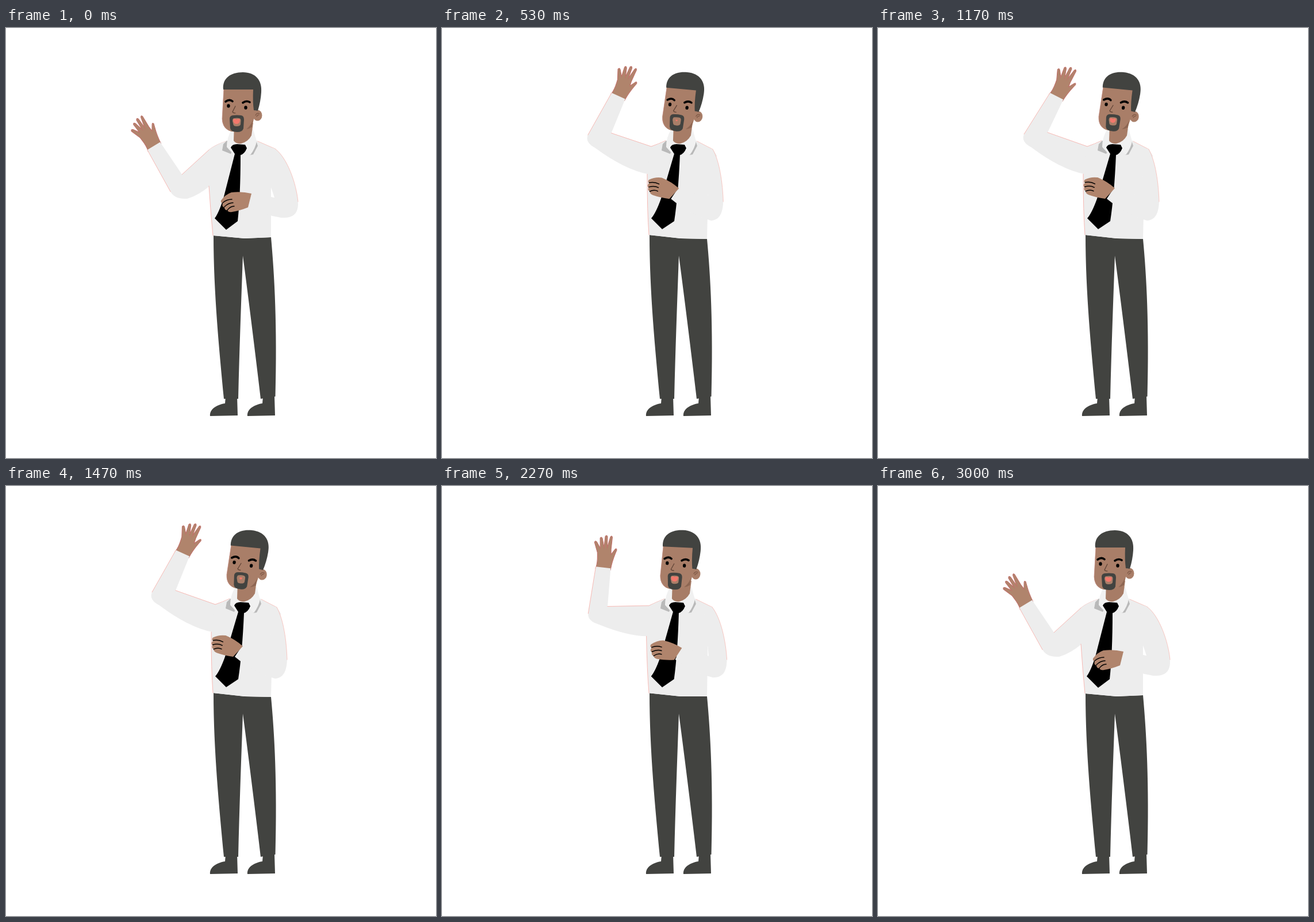
An HTML page with a canvas for the animation above (3030 ms loop, 748 by 748 pixels).

```html
<!DOCTYPE html>
<html>
<head>
<meta charset="utf-8">
<style>
html, body { margin: 0; width: 100%; height: 100%; overflow: hidden; background: #fff; }
canvas { display: block; width: 748px; height: 748px; }
</style>
</head>
<body>
<canvas id="stage" width="748" height="748"></canvas>
<script>
const ctx = document.getElementById('stage').getContext('2d');
const LOOP = 3030, RAD = Math.PI / 180;
const DARK = '#424340', SHIRT = '#ededed', SKIN = '#b0846c', FACE = '#a97e68', FRINGE = '#f6b3ad';

const clamp = x => Math.min(1, Math.max(0, x));
const lerp = (a, b, p) => a + (b - a) * p;
const smooth = x => (x = clamp(x), x * x * (3 - 2 * x));
const cubic = x => (x = clamp(x), x < .5 ? 4 * x ** 3 : 1 - 4 * (1 - x) ** 3);

// Blend two path strings of the same structure
function mix(a, b, p) {
  const to = b.match(/-?[\d.]+/g);
  let i = 0;
  return a.replace(/-?[\d.]+/g, n => lerp(+n, +to[i++], p));
}
function fill(color, d) {
  ctx.fillStyle = color;
  ctx.fill(new Path2D(d));
}
function line(color, width, d) {
  ctx.strokeStyle = color;
  ctx.lineWidth = width;
  ctx.stroke(new Path2D(d));
}
function dot(color, x, y, rx, ry = rx) {
  ctx.fillStyle = color;
  ctx.beginPath();
  ctx.ellipse(x, y, rx, ry, 0, 0, 7);
  ctx.fill();
}
function placed(x, y, angle, draw) {
  ctx.save();
  ctx.translate(x, y);
  ctx.rotate(angle);
  draw();
  ctx.restore();
}

// Time and opening of the mouth
const talk = [[0, 1], [180, .5], [340, 1], [530, .3], [720, .9], [870, .6], [1020, .35],
  [1230, 1], [1470, .4], [1660, .9], [1870, .55], [2040, .4], [2270, 1], [2480, .4], [2740, .8], [2900, .6], [3030, 1]];
function mouthAt(t) {
  const i = talk.findIndex(k => k[0] > t), [t0, a] = talk[i - 1], [t1, b] = talk[i];
  return lerp(a, b, smooth((t - t0) / (t1 - t0)));
}

function legs(p) {
  fill(DARK, mix(
    'M361,361 L415,366 L461,364 C467,430 472,520 468.5,641 L443,645 Q427,510 412,396 C409,480 406,560 404,645 L379,645 C371,560 361,460 361,361Z',
    'M361,360 L415,366 L461,367 C467,430 472,520 468.5,641 L443,645 Q427,510 412,396 C409,480 406,560 404,645 L379,645 C371,560 361,460 361,360Z', p));
  for (const x of [0, 65])
    placed(x, 0, 0, () => fill(DARK, 'M382,641 L402,640 L403,674 L355,675 C354,664 364,656 381,653Z'));
}

function waveHand() {
  const d = 'M-13,3 C-10,-8 -12,-16 -13,-25 L-20,-42 Q-19,-46 -16,-43 L-9,-33 L-11,-50 Q-9.5,-54 -7,-50 L-2.5,-35 ' +
    'L-2.5,-54 Q-.5,-58 1.5,-54 L3,-35 L6.5,-54 Q8.5,-58 10,-54 L10,-33 L11,-24 L16.5,-33 Q19,-37 20,-33 C17,-22 14,-14 13,3Z';
  fill(SKIN, d);
  line('#c0706a', 1.1, d);
}

function leftArm(p, t) {
  const up = lerp(132.6, 195.4, p) * RAD;
  const ex = 355 + 84 * Math.cos(up), ey = 212 + 84 * Math.sin(up);
  const wave = -2.5 * Math.cos((t - 1670) / 900 * 2 * Math.PI);
  const lean = (lerp(-31, 25, p) + wave * p) * RAD;
  const c = Math.cos(lean), s = Math.sin(lean);
  const wx = ex + 80 * s, wy = ey - 80 * c;
  const at = (x0, y0, x1, y1) => `${ex + lerp(x0, x1, p)},${ey + lerp(y0, y1, p)} `;
  const cuff = k => `${wx + k * c},${wy + k * s} `;
  const inner = at(8, -19, 21, -8), outer = at(-12, 11, -20, -5);
  const elbow = at(-4, 25, -26, 8) + at(18, 23, -7, 18);
  const top = mix('M383,197 Q364,203 353,212', 'M389,196 Q376,202 364,206', p);
  placed(wx, wy, lean, waveHand);
  fill(SHIRT, `${top} L${inner} L${cuff(13)} L${cuff(-13)} L${outer} Q${elbow} ` +
    mix('Q335,291 354,275 L380,270Z', 'Q318,246 359,254 L380,250Z', p));
  line(FRINGE, .9, `${top} L${inner}M${cuff(-13)} L${outer}`);
}

function torso(p) {
  fill(SHIRT, mix(
    'M385,196 Q364,203 353,212 L353,275 Q356,320 360,361 L415,366 L461,364 L461,280 L475,222 L468,210 L434,195Z',
    'M390,196 Q374,203 362,208 L357,254 Q357,320 360,360 L415,366 L461,367 L463,280 L478,222 L471,211 L440,195Z', p));
  line(FRINGE, .9, mix('M353,275 Q356,320 360,361', 'M357,254 Q357,320 360,360', p));
  line(FRINGE, .7, mix('M438,197 L468,210', 'M444,197 L471,211', p));
}

function collar(p) {
  placed(6 * p, 0, 0, () => {
    fill('#b9b9b9', 'M384,196 L378,202 L376,213 L391,219 L398,205ZM435,196 L438,205 L430,220 L424,221Z');
    fill('#f1f1f1', 'M393,176 Q384,190 384,207 L393,217 L402,205 L412,206 L425,221 Q434,209 436,197 L430,176Z');
    fill('#a77c66', 'M397,168 L396,196 Q400,202 409,201 Q421,198 427,187 L430,165Z');
  });
}

function tie(p) {
  fill('#000', mix(
    'M391,208 Q393,202 402,202 L416,203 L419,209 Q415,219 408,221 Q408,290 403,336 L383,351 L363,331 Q370,322 378,297 L398,219Z',
    'M397,208 Q399,202 408,202 L422,203 L425,209 Q421,219 414,221 Q411,290 404,336 L383,350 L364,331 Q372,322 381,297 L404,219Z', p));
}

function rightArm(p) {
  fill(SHIRT, mix(
    'M455,206 L468,210 C489,225 505,270 508,302 C509,323 500,331 479,330 Q450,326 420,311 L427,288 L467,295 L461,277Z',
    'M455,206 L471,211 C483,232 488,270 489,302 C488,325 481,334 468,335 Q432,325 398,297 L412,276 L462,296 L463,277Z', p));
  line(FRINGE, .7, mix('M468,210 C489,225 505,270 508,302', 'M471,211 C483,232 488,270 489,302', p));
  placed(lerp(424, 404, p), lerp(299, 287, p), 29 * p * RAD, () => {
    fill(SKIN, 'M3,-11 Q-14,-15 -32,-13 Q-43,-9 -50,1 Q-51,5 -47,6 Q-49,12 -44,13 Q-44,18 -39,18 Q-37,22 -31,21 Q-18,19 -3,13Z');
    line('#000', 1.5, 'M-47,5 Q-40,-1 -31,-1M-44,12 Q-37,5 -29,5M-39,18 Q-34,11 -27,11');
  });
}

function head(p, mouth) {
  placed(405 + 4.3 * p, 195 - 1.2 * p, 5.5 * p * RAD, () => {
    ctx.translate(-405, -195);
    dot(FACE, 437.5, 152, 8, 9.5);
    fill(FACE, 'M379,102 L376,158 C376,170 382,177 392,180 Q413,182 428,172 L434,145 L432,102Z');
    line('#c58a80', .7, 'M379,106 L376,158 Q377,172 387,178');
    fill('#8d6652', 'M429,160 L428,172 Q424,175 418,176 Q426,170 429,160Z');
    line('#7d5846', 1.2, 'M434,152 Q436,147 441,149M436,154 Q437,151 440,151');
    fill(DARK, 'M378,107 C376,88 390,77 412,77 C434,77 446,91 444,112 Q443,128 438,144 L431,143 Q429,128 430,107Z');
    line('#000', 3.6, 'M382,128 Q389,123 394,127.5M412,130 Q418,125.5 424,129');
    dot('#000', 387, 135.5, 2.7, 3.2);
    dot('#000', 417, 138.5, 2.7, 3.2);
    line('#5c4134', 1.2, 'M399,136 L394,146 Q395,148 399,148');
    fill(DARK, 'M394,152 Q402,151 409,152 Q414,153 414,159 L413,175 Q411,181 402,181 Q391,181 390,174 L389,158 Q389,153 394,152Z');
    fill(FACE, 'M397,157 Q402,156 406,157 Q409,158 408.5,162 L408,168 Q407,171 401,171 Q396,171 395.5,168 L394,162 Q394,157 397,157Z');
    placed(401, 162, 0, () => {
      ctx.scale(mouth, mouth);
      fill('#f2786c', 'M-6,-3 Q-3,-5 0,-3 Q3,-5 6,-3 Q6,5 0,5 Q-6,5 -6,-3Z');
    });
  });
}

function frame(now) {
  const t = now % LOOP;
  const arm = smooth(t / 570) - cubic((t - 1780) / 1110);
  const nod = smooth(t / 620) - cubic((t - 1560) / 1400);
  ctx.fillStyle = '#fff';
  ctx.fillRect(0, 0, 748, 748);
  ctx.lineCap = 'round';
  legs(arm);
  leftArm(arm, t);
  torso(arm);
  collar(arm);
  tie(arm);
  rightArm(arm);
  head(nod, mouthAt(t));
}

const start = performance.now();
function tick() {
  frame(performance.now() - start);
  requestAnimationFrame(tick);
}
tick();
</script>
</body>
</html>
```
